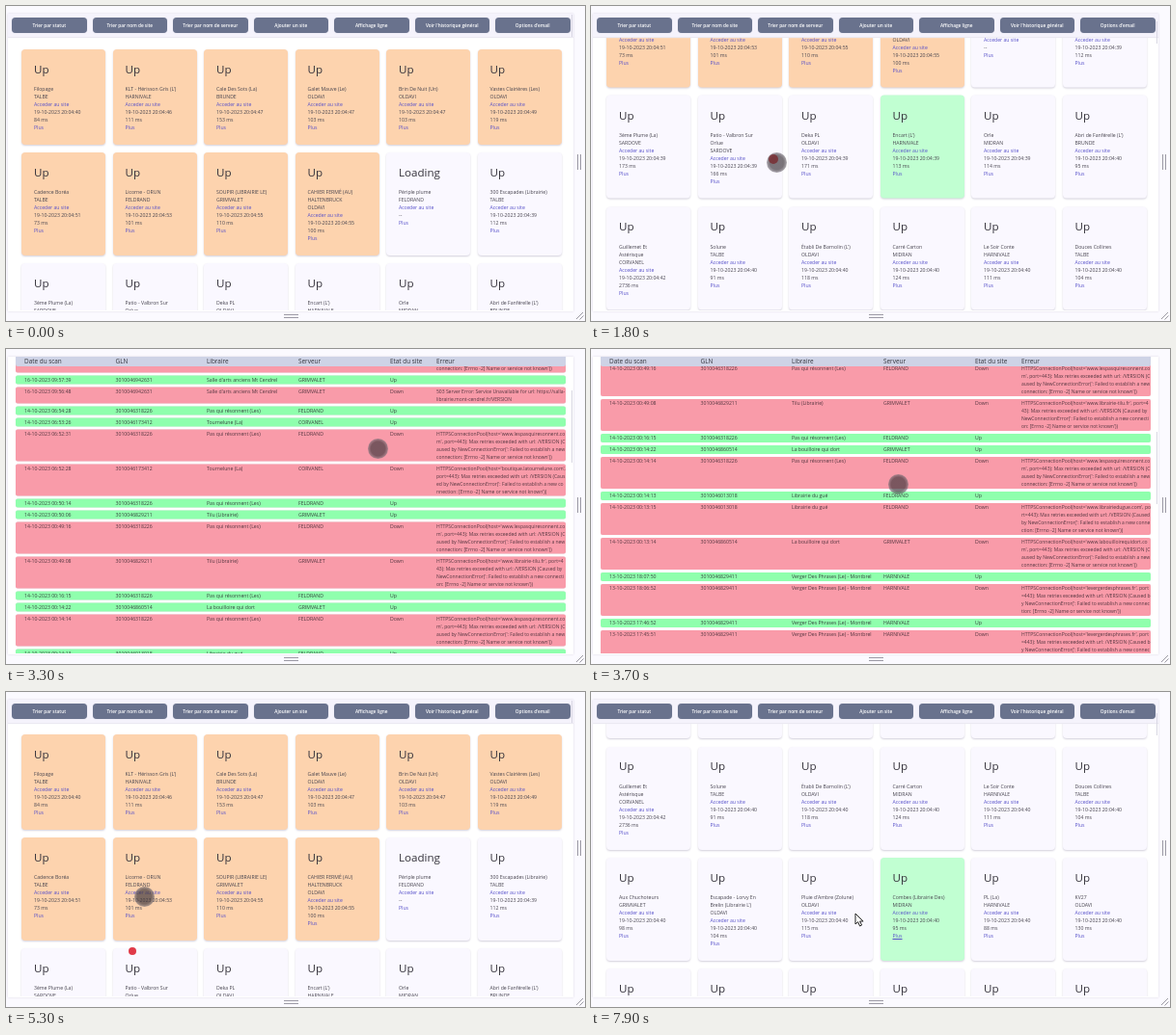
These frames come from a looping animation (600x327 px, 8000 ms). An HTML page:

```html
<!DOCTYPE html>
<html lang="fr">
<head>
<meta charset="utf-8">
<style>
html, body { margin: 0; width: 100%; height: 100%; overflow: hidden; background: #fbfaff; }
#stage { position: relative; width: 600px; height: 327px; overflow: hidden; background: #fbfaff;
  font: 5.15px/8px "Open Sans", "Noto Sans", sans-serif; color: #48454f; }
#stage div, #stage svg { position: absolute; box-sizing: border-box; white-space: pre; }
#edge { left: 2px; top: 8px; width: 586px; height: 309px; background: #fff; box-shadow: 0 0 2px #d8d5e2; }
#view { left: 0; top: 0; width: 600px; height: 327px; clip-path: inset(8px 12px 11px 2px); }
.page, .list { left: 0; top: 0; width: 600px; height: 327px; }
.card { width: 87px; border-radius: 4px; background: #faf8ff; box-shadow: 0 1px 2px #d3d0dc; }
.card.late { background: #fdd3ae; }
.card.hot { background: #c1ffd2; }
.card .title { left: 13px; top: 12.8px; font-size: 11.6px; line-height: 16px; color: #34323a; }
.card .text { left: 13px; top: 37px; }
a { color: #5751c9; }
.hot.under a:last-child { text-decoration: underline; }
.bar { left: 2px; top: 8px; width: 586px; height: 24px; background: #f5f3fc; box-shadow: 0 1px 1px #ebe9f2; }
.button { background: #69728d; color: #fff; border-radius: 4px; text-align: center; font-size: 4.75px;
  font-weight: 600; line-height: 16px; height: 16.5px; box-shadow: 0 0 1px #b7bac8; }
.head { left: 10px; top: 38px; width: 570px; height: 23px; background: #ced3e6; border-radius: 2px; color: #33343c; }
.row { left: 10px; width: 570px; border-radius: 2px; background: #8fffad; box-shadow: 0 0 1px #e6dde6; color: #34413d; }
.row.down { background: #f99ba9; color: #553640; }
#stage .error { left: 436px; width: 134px; font-size: 5px; white-space: normal; word-break: break-all; }
#thumb { left: 586px; width: 1px; background: #d8d6e2; }
#popup { left: 408px; top: -12px; width: 200px; height: 19px; background: #f9f6fe; border-radius: 3px; box-shadow: 0 0 3px #cfcbda; }
#spot { width: 21px; height: 21px; margin: -10.5px; border-radius: 50%;
  background: radial-gradient(closest-side, rgba(62,54,60,.68) 70%, rgba(120,114,122,.6)); }
#dot { border-radius: 50%; transform: translate(-50%, -50%); }
</style>
</head>
<body>
<div id="stage">
  <div id="edge"></div>
  <div id="view">
    <div class="page" id="home"><div class="list" id="cards"></div><div class="bar"></div></div>
    <div class="page" id="history"><div class="list" id="rows"></div></div>
    <div id="thumb"></div>
  </div>
  <div id="popup"></div>
  <svg width="600" height="327" fill="none" stroke="#9c9aa5" stroke-width="1">
    <path d="M288 320.5h15M288 323.5h15M592.5 154v16M595.5 154v16M591 325l7-7M594.5 325.5l4-4"/>
  </svg>
  <div id="spot"></div>
  <div id="dot"></div>
  <svg id="arrow" width="12" height="16"><path d="M1 1v11l2.6-2.4 2 4.4 2-1-2-4h3.5z" fill="#fff" stroke="#222"/></svg>
</div>
<script>
const $ = id => document.getElementById(id);

function add(parent, cls, style, html = '') {
  const el = document.createElement('div');
  el.className = cls;
  for (const k in style) el.style[k] = style[k] + 'px';
  el.innerHTML = html;
  return parent.appendChild(el);
}

const button = (parent, left, top, width, label) => add(parent, 'button', { left, top, width }, label);

// Home page: name|server|second|delay
const sites = `Filopage|TALBE|40|84
KLT - Hérisson Gris (L')|HARNIVALE|46|111
Cale Des Sots (La)|BRUNDE|47|153
Galet Mauve (Le)|OLDAVI|47|103
Brin De Nuit (Un)|OLDAVI|47|103
Vastes Clairières (Les)|OLDAVI|49|119
Cadence Boréa|TALBE|51|73
Licorne - ORUN|FELDRAND|53|101
SOUPIR (LIBRAIRIE LE)|GRIMVALET|55|110
CAHIER FERMÉ (AU)/HALTENBRUCK|OLDAVI|55|100
Périple plume|FELDRAND
300 Escapades (Librairie)|TALBE|39|112
3ème Plume (La)|SARDOVE|39|173
Patio - Valbron Sur/Orlue|SARDOVE|39|166
Deka PL|OLDAVI|39|171
Encart (L')|HARNIVALE|39|113
Orle|MIDRAN|39|114
Abri de Fanférelle (L')|BRUNDE|40|95
Guillemet Et/Astérisque|CORVANEL|42|2736
Solune|TALBE|40|91
Établi De Barnolin (L')|OLDAVI|40|118
Carré Carton|MIDRAN|40|124
Le Soir Conte|HARNIVALE|40|111
Douces Collines|TALBE|40|104
Aux Chuchoteurs|GRIMVALET|40|98
Escapade - Lorvy En/Brelin (Librairie L')|OLDAVI|40|104
Pluie d'Ambre (Zolune)|OLDAVI|40|115
Combes (Librairie Des)|MIDRAN|40|95
PL (La)|HARNIVALE|40|88
KV27|OLDAVI|40|130`.split('\n');

const cardTops = [45, 152, 267.3, 382.7, 498, 613];
const cards = [];
for (let i = 0; i < 36; i++) {
  const row = Math.floor(i / 6);
  const card = add($('cards'), i < 10 ? 'card late' : 'card',
    { left: 16 + i % 6 * 94.5, top: cardTops[row], height: row ? 107 : 99 });
  cards.push(card);
  const [name, server, sec, delay] = (sites[i] || '').split('|');
  add(card, 'title', {}, name && !sec ? 'Loading' : 'Up');
  if (!name) continue;
  const scan = sec ? `19-10-2023 20:04:${sec}\n${delay} ms` : '--';
  add(card, 'text', {}, `${name.replace('/', '\n')}\n${server}\n<a>Acceder au site</a>\n${scan}\n<a>Plus</a>`);
}
['Trier par statut', 'Trier par nom de site', 'Trier par nom de serveur', 'Ajouter un site',
  'Affichage ligne', "Voir l'historique général", "Options d'email"]
  .forEach((label, i) => button($('home'), 6 + i * 83.5, 11.6, 77.5, label));

// History page: name|server|code|host
const shops = `Folbrune (Librairie)|HARNIVALE|3010046201518|librairie-folbrune.fr
Pas qui résonnent (Les)|FELDRAND|3010046318226|www.lespasquiresonnent.com
Salle d'arts anciens Mt Cendrel|GRIMVALET|3010046942631|
Tournelune (La)|CORVANEL|3010046173412|boutique.latournelune.com
Tilu (Librairie)|GRIMVALET|3010046829211|www.librairie-tilu.fr
La bouilloire qui dort|GRIMVALET|3010046860514|www.labouilloirequidort.com
Librairie du gué|FELDRAND|3010046013018|www.librairiedugue.com
Verger Des Phrases (Le) - Montbrel|HARNIVALE|3010046829411|levergerdesphrases.fr`
  .split('\n').map(s => s.split('|'));

// day, time, shop, U(p) or D(own)
const scans = `19 02:01:30 0U,19 02:00:45 0D,16 10:10:37 1U,16 10:09:39 1D,16 09:57:39 2U,16 09:56:48 2D,
14 06:54:28 1U,14 06:53:26 3U,14 06:52:31 1D,14 06:52:28 3D,14 00:50:14 1U,14 00:50:06 4U,
14 00:49:16 1D,14 00:49:08 4D,14 00:16:15 1U,14 00:14:22 5U,14 00:14:14 1D,14 00:14:13 6U,
14 00:13:15 6D,14 00:13:14 5D,13 18:07:50 7U,13 18:06:52 7D,13 17:46:52 7U,13 17:45:51 7D`.split(',');

const failure = host => host
  ? `HTTPSConnectionPool(host='${host}', port=443): Max retries exceeded with url: /VERSION (Caused by NewConnectionError(': Failed to establish a new connection: [Errno -2] Name or service not known'))`
  : '503 Server Error: Service Unavailable for url: https://salla-librairie.mont-cendrel.fr/VERSION';

const columns = [9, 103.5, 198, 293, 388];
let rowTop = 64;
for (const scan of scans) {
  const [day, time, [shop, state]] = scan.trim().split(' ');
  const [name, server, code, host] = shops[shop];
  const down = state === 'D';
  const height = !down ? 9 : host ? 33 : 17;
  const row = add($('rows'), down ? 'row down' : 'row', { top: rowTop, height });
  [`${day}-10-2023 ${time}`, code, name, server, down ? 'Down' : 'Up']
    .forEach((text, i) => add(row, '', { left: columns[i], top: .3 }, text));
  if (down) add(row, 'error', { top: .3 }, failure(host));
  rowTop += height + 3;
}
button($('rows'), 9, 14, 36, 'Accueil');
button($('rows'), 448, 14, 85, 'Page suivante');
const head = add($('history'), 'head', {});
add(head, '', { left: 250, top: 4, fontSize: 7.3 }, 'Historique des états');
['Date du scan', 'GLN', 'Libraire', 'Serveur', 'Etat du site', 'Erreur']
  .forEach((text, i) => add(head, '', { left: columns[i] ?? 436, top: 14.4, fontSize: 6.4 }, text));

// Motion
function track(keys, t) {
  const i = keys.findIndex(k => k[0] > t);
  if (i < 0) return keys[keys.length - 1].slice(1);
  if (!i) return keys[0].slice(1);
  const a = keys[i - 1], b = keys[i];
  const u = (t - a[0]) / (b[0] - a[0]);
  return a.slice(1).map((v, j) => v + (b[j + 1] - v) * u);
}
const homeScroll = [[100, 0], [500, 35], [1400, 150], [1800, 174.4], [2000, 165], [2600, 0],
  [5200, 0], [5300, 1], [5500, 25], [6100, 300], [6350, 326]];
const historyScroll = [[2950, 0], [3150, 50], [3550, 270], [3700, 296], [3800, 280], [4200, 133], [4500, 10], [4600, 0]];
const pointer = [[900, 150, 190], [1800, 192, 162], [2500, 462, 18], [2800, 458, 22], [2900, 453, 67],
  [3700, 318, 140], [4200, 330, 78], [4700, 27, 22], [4900, 27, 22], [5300, 143, 212],
  [6400, 150, 214], [7300, 150, 190], [7900, 274, 230]];
const within = (t, a, b) => t >= a && t < b;
const show = (el, on) => el.style.display = on ? '' : 'none';

function place(el, x, y) {
  el.style.left = x + 'px';
  el.style.top = y + 'px';
}

function draw(t) {
  const past = within(t, 2800, 4900);
  const [scroll] = track(past ? historyScroll : homeScroll, t);
  show($('home'), !past);
  show($('history'), past);
  $(past ? 'rows' : 'cards').style.transform = `translateY(${-scroll}px)`;
  head.style.transform = `translateY(${-Math.min(scroll, 43)}px)`;
  $('thumb').style.top = 9 + scroll * (past ? .26 : .04) + 'px';
  $('thumb').style.height = (past ? 75 : 23) + 'px';
  show($('popup'), within(t, 2800, 3200));

  cards[15].classList.toggle('hot', within(t, 1700, 2000));
  cards[27].className = t >= 7700 ? 'card hot under' : 'card';

  const [x, y] = track(pointer, t);
  const arrow = t >= 7300;
  const pressed = within(t, 4100, 4400);
  show($('spot'), t >= 900 && !arrow && !pressed);
  show($('arrow'), arrow);
  place($('spot'), x, y);
  place($('arrow'), x - 1, y - 1);

  const dot = within(t, 1700, 1900) ? [x - 3, y - 3, 10, 'rgba(120,30,36,.7)']
    : pressed ? [x, y, 15.5, 'rgba(218,62,72,.85)']
    : within(t, 5200, 5500) ? [131, 269, 8, '#e03a48'] : null;
  show($('dot'), dot);
  if (dot) {
    place($('dot'), dot[0], dot[1]);
    $('dot').style.width = $('dot').style.height = dot[2] + 'px';
    $('dot').style.background = dot[3];
  }
}

const start = performance.now();
function tick() {
  const t = (performance.now() - start) % 8000;
  draw(Math.floor(t / 100) * 100);
  requestAnimationFrame(tick);
}
tick();
</script>
</body>
</html>
```
